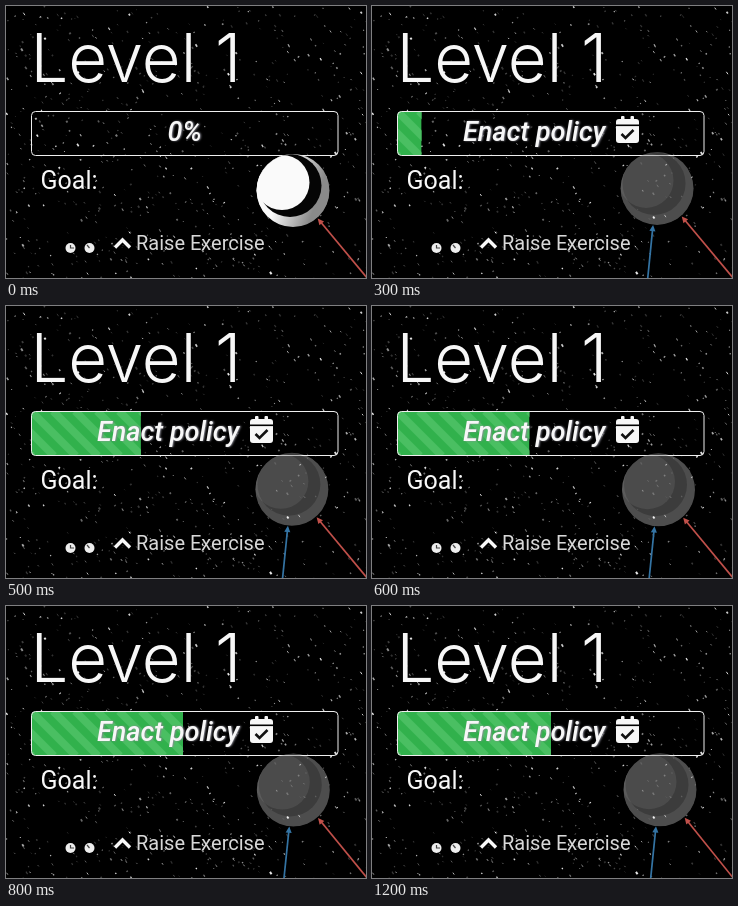
Animation of 360 by 272 pixels, one loop 1300 ms. Source, as an HTML page with a canvas:

```html
<!DOCTYPE html>
<html lang="en">
<head>
<meta charset="utf-8">
<title>Level 1</title>
<style>
html, body { margin: 0; width: 100%; height: 100%; overflow: hidden; background: #000; }
canvas { display: block; }
</style>
</head>
<body>
<canvas id="stage" width="360" height="272"></canvas>
<script>
const ctx = document.getElementById('stage').getContext('2d');
const LOOP = 1300, STEP = 100, TAU = Math.PI * 2;

// Moon centre every 200 ms
const drift = [[287, 184.5], [284.8, 182], [285.3, 182.8], [286.5, 183.7],
  [287.3, 184], [288, 184], [288, 183.7], [288, 183.7]];

let seed = 41;
const rnd = () => (seed = (seed * 16807) % 2147483647) / 2147483647;
const stars = Array.from({ length: 720 }, () => ({
  x: rnd() * 360, y: rnd() * 272,
  light: 0.2 + 0.8 * rnd() ** 1.8,
  size: 0.9 + 1.1 * rnd() ** 3,
  tail: rnd() ** 2 * 1.8
}));

function line(points, color, width) {
  ctx.strokeStyle = color;
  ctx.lineWidth = width;
  ctx.beginPath();
  points.forEach(p => ctx.lineTo(...p));
  ctx.stroke();
}

function disc(x, y, r, color) {
  ctx.fillStyle = color;
  ctx.beginPath();
  ctx.arc(x, y, r, 0, TAU);
  ctx.fill();
}

function box(x, y, w, h, r, color) {
  ctx.fillStyle = color;
  ctx.beginPath();
  ctx.roundRect(x, y, w, h, r);
  ctx.fill();
}

function text(str, x, y, font, color = '#f7f7f7') {
  ctx.font = font;
  ctx.fillStyle = color;
  ctx.fillText(str, x, y);
}

// CSS "ease": cubic-bezier(.25, .1, .25, 1)
function ease(x) {
  if (x <= 0) return 0;
  if (x >= 1) return 1;
  let lo = 0, hi = 1;
  for (let i = 0; i < 20; i++) {
    const u = (lo + hi) / 2, v = 1 - u;
    if (0.75 * u * v + u ** 3 < x) lo = u; else hi = u;
  }
  return 0.3 * lo * (1 - lo) ** 2 + 3 * lo * lo * (1 - lo) + lo ** 3;
}

function drawStars() {
  for (const s of stars) {
    line([[s.x, s.y], [s.x + 0.7 + s.tail * 0.5, s.y + 0.7 + s.tail]],
      `rgba(240,240,240,${s.light})`, s.size);
  }
}

function drawCalendar() {
  box(244, 113, 23, 24, 3, '#f7f7f7');
  box(249, 110, 3.5, 6, 1, '#f7f7f7');
  box(258.5, 110, 3.5, 6, 1, '#f7f7f7');
  ctx.fillStyle = '#000';
  ctx.fillRect(244, 118.5, 23, 1.6);
  line([[249.5, 128], [253.5, 132], [261.5, 124]], '#111', 2.6);
}

function drawBar(t) {
  const fill = 154 * ease((t - 204) / 700);
  ctx.save();
  ctx.beginPath();
  ctx.roundRect(25.5, 105.5, 306.5, 44, 4);
  ctx.clip();
  ctx.beginPath();
  ctx.rect(25, 105, fill, 45);
  ctx.clip();
  ctx.fillStyle = '#31b14c';
  ctx.fillRect(25, 105, fill, 45);
  for (let x = -44; x < 160; x += 22) {
    line([[25 + x, 105], [70 + x, 150]], '#4abf62', 7.8);
  }
  ctx.restore();

  ctx.strokeStyle = '#eee';
  ctx.lineWidth = 1;
  ctx.beginPath();
  ctx.roundRect(25.5, 105.5, 306.5, 44, 4);
  ctx.stroke();

  const font = 'italic 500 27px Roboto, sans-serif';
  ctx.save();
  ctx.shadowColor = '#8a8a94';
  ctx.shadowBlur = 2;
  ctx.shadowOffsetX = 1;
  if (t < 300) text('0%', 161.5, 134.5, font);
  else text('Enact policy', 91, 134.5, font);
  ctx.restore();
  if (t >= 300) drawCalendar();
}

function drawMoon(x, y, lit) {
  let [rim, shade, face] = ['rgba(255,255,255,.3)', 'rgba(0,0,0,.22)', 'rgba(255,255,255,.08)'];
  if (lit) {
    rim = ctx.createLinearGradient(x - 12, y - 4, x + 24, y + 8);
    rim.addColorStop(0, '#fafafa');
    rim.addColorStop(1, '#8a8a8a');
    [shade, face] = ['#050505', '#fafafa'];
  }
  ctx.save();
  ctx.beginPath();
  ctx.arc(x, y, 36.5, 0, TAU);
  ctx.clip();
  disc(x, y, 37, rim);
  disc(x - 3, y - 5, 31.5, shade);
  disc(x - 11, y - 8, 27.5, face);
  ctx.restore();
}

function arrow(x, y, fromX, fromY, color) {
  const a = Math.atan2(fromY - y, fromX - x);
  line([[x + 3 * Math.cos(a), y + 3 * Math.sin(a)], [fromX, fromY]], color, 1.7);
  ctx.fillStyle = color;
  ctx.beginPath();
  ctx.moveTo(x, y);
  for (const d of [-0.45, 0.45]) ctx.lineTo(x + 7 * Math.cos(a + d), y + 7 * Math.sin(a + d));
  ctx.fill();
}

function drawLabels() {
  text('Level 1', 24.5, 76, '300 67px Inter, sans-serif');
  text('Goal:', 34.5, 183, '400 25px Roboto, sans-serif');
  text('Raise Exercise', 130, 244, '400 20px Roboto, sans-serif', '#d8d8d8');
  line([[109, 241.5], [116.5, 234], [124, 241.5]], '#f7f7f7', 3.4);
  for (const x of [64.5, 83.5]) disc(x, 242, 5, '#eee');
  line([[64.5, 239], [64.5, 242], [68, 242]], '#444', 1.2);
  line([[81, 239], [83.5, 242]], '#444', 1.2);
}

function draw(t) {
  ctx.fillStyle = '#000';
  ctx.fillRect(0, 0, 360, 272);
  drawStars();
  drawLabels();
  drawBar(t);

  const i = Math.floor(t / 200), f = t / 200 - i;
  const [x, y] = drift[i].map((v, k) => v + (drift[i + 1][k] - v) * f);
  drawMoon(x, y, t < 300);
  arrow(x + 24.7, y + 28, 362, 273, '#c0504a');
  if (t >= 300) arrow(x - 4, y + 36.5, x - 9.5, 274, '#3474a4');
}

const start = performance.now();
function tick() {
  const t = (performance.now() - start) % LOOP;
  draw(Math.floor(t / STEP) * STEP);
  requestAnimationFrame(tick);
}
tick();
</script>
</body>
</html>
```
